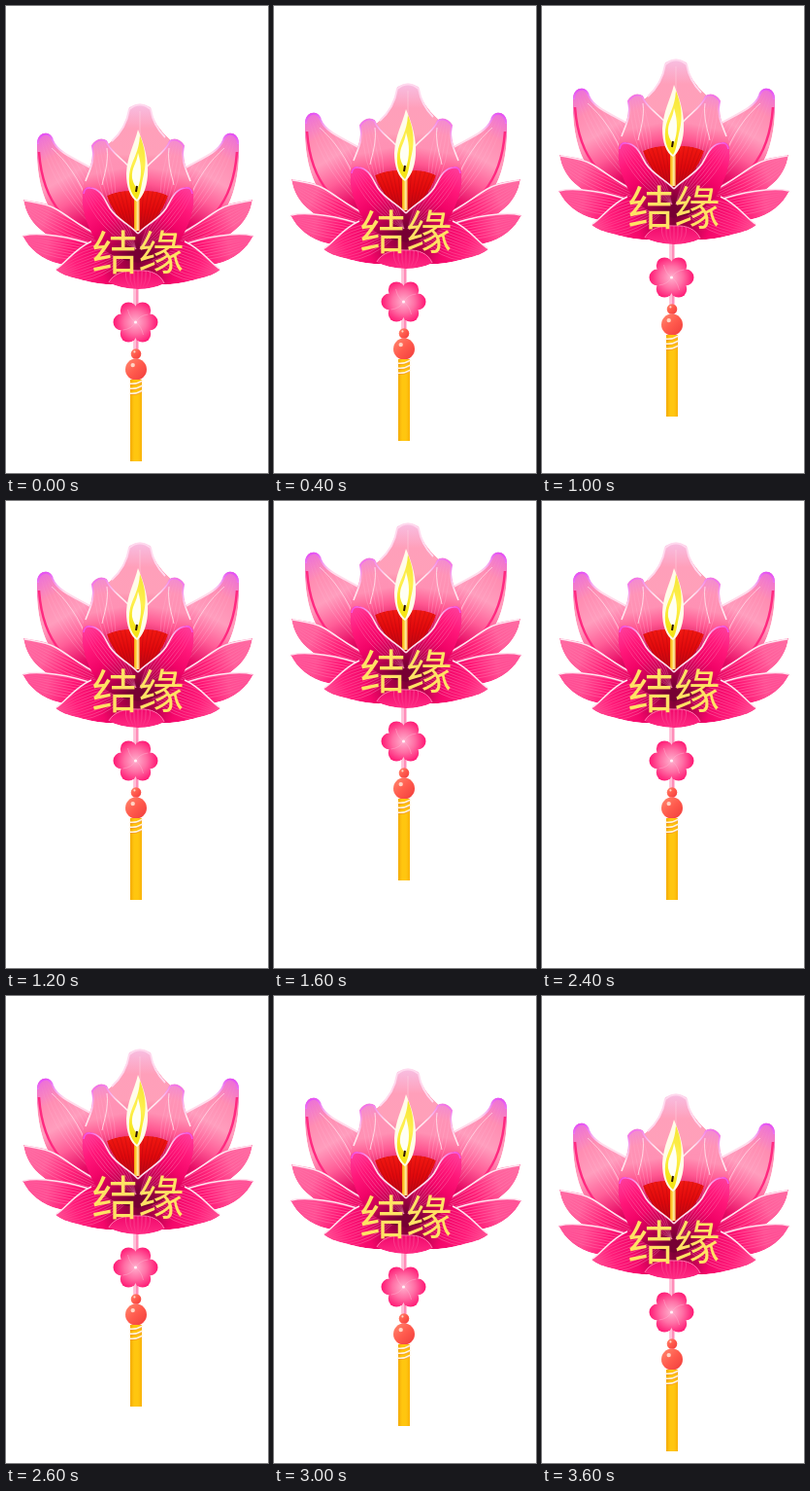
Animation of 270 by 480 pixels, one loop 3.8 s. Source, as an HTML page with a canvas:

```html
<!DOCTYPE html>
<html lang="zh">
<head>
<meta charset="utf-8">
<style>
html, body { margin: 0; width: 100%; height: 100%; overflow: hidden; background: #fff; }
canvas { display: block; width: 270px; height: 480px; }
</style>
</head>
<body>
<canvas id="stage" width="270" height="480"></canvas>
<script>
const ctx = document.getElementById('stage').getContext('2d');
const AXIS = 136;
const STEP = 200;
const LIFT = [0, 11, 21, 26, 36, 46, 58, 68, 78, 90];

function gradient([x0, y0, x1, y1], colors) {
  const g = ctx.createLinearGradient(x0, y0, x1, y1);
  colors.forEach((c, i) => g.addColorStop(i / (colors.length - 1), c));
  return g;
}

function mirrored(draw) {
  draw();
  ctx.save();
  ctx.translate(2 * AXIS, 0);
  ctx.scale(-1, 1);
  draw();
  ctx.restore();
}

function fill(d, style) {
  ctx.fillStyle = style;
  ctx.fill(new Path2D(d));
}

function stroke(d, style, width) {
  ctx.strokeStyle = style;
  ctx.lineWidth = width;
  ctx.stroke(new Path2D(d));
}

function disc(x, y, r, style) {
  ctx.fillStyle = style;
  ctx.beginPath();
  ctx.arc(x, y, r, 0, 2 * Math.PI);
  ctx.fill();
}

// A petal shaded from tip to base, with a fan of veins and a light upper rim.
function petal({ d, line, colors, rim, veins = 0, spread = 25, rimColor = '#ffe3ef', rimWidth = 1.6 }) {
  const [x0, y0, x1, y1] = line;
  const length = Math.hypot(x1 - x0, y1 - y0);
  const nx = (y0 - y1) / length, ny = (x1 - x0) / length;
  ctx.save();
  ctx.clip(new Path2D(d));
  fill(d, gradient(line, colors));
  const veinColor = gradient(line, ['#ffd0e300', '#ffb5d377', '#ff8fbb66']);
  for (let i = 0; i < veins; i++) {
    const k = spread * ((2 * i + 1) / veins - 1);
    const mx = (x0 + x1) / 2 + nx * k, my = (y0 + y1) / 2 + ny * k;
    stroke(`M${x1} ${y1}Q${mx} ${my} ${x0 + nx * k * .3} ${y0 + ny * k * .3}`, veinColor, .7);
  }
  ctx.restore();
  if (rim) stroke(rim, rimColor, rimWidth);
}

function outerPetals() {
  mirrored(() => {
    petal({
      d: 'M32 141C32 134 37 129 43 131Q47 132 48 137C53 150 74 158 92 168L125 240C85 235 62 230 48 213C35 194 31 166 32 141Z',
      line: [42, 130, 104, 238], colors: ['#ec70d8', '#ff8db2', '#ff9dbd', '#ff5e98', '#e80c66', '#9a0042'],
      veins: 8, spread: 30, rim: 'M33 142C33 134 38 131 43 132Q47 134 48 138C53 151 74 158 90 168',
      rimColor: gradient([40, 130, 50, 155], ['#e34af5', '#ffdcec']), rimWidth: 2
    });
    stroke('M34 150C36 177 43 197 56 212', '#ff2a80', 2.5);
    stroke('M47 146C61 158 77 179 85 204', '#ffe4efaa', 1);
    petal({
      d: 'M18 199C31 201 42 202 52 208C67 217 80 229 124 246L120 256C82 250 52 244 38 232C26 223 20 212 18 199Z',
      line: [18, 202, 116, 250], colors: ['#ff6aa2', '#ff5f9b', '#ff2078', '#e60562', '#920040'],
      veins: 9, rim: 'M19 200C31 202 42 203 52 209C66 217 78 228 96 236'
    });
    petal({
      d: 'M17 236C32 231 66 237 118 244L112 270C86 268 70 269 55 265C37 261 24 250 17 236Z',
      line: [17, 238, 122, 258], colors: ['#ff5297', '#ff4c92', '#ff1273', '#dd005c', '#85003a'],
      veins: 10, rim: 'M18 236C34 232 67 237 94 247'
    });
  });
}

function backPetal() {
  petal({
    d: 'M127 104Q138 97 149 104C151 117 158 127 169 137L169 202L105 202L104 143C116 133 124 121 127 104Z',
    line: [136, 100, 136, 205],
    colors: ['#f7c0e4', '#ff9fba', '#ffa0b9', '#f6648f', '#dc2a61'],
    rim: 'M109 139C118 131 125 119 127 106Q138 97 149 106C151 118 156 127 164 135',
    rimColor: '#ffd9ee', rimWidth: 1.8
  });
  stroke('M138 108V132', '#ffe0ea66', 1);
}

function innerPetals() {
  mirrored(() => {
    petal({
      d: 'M88 143Q95 133 104 138C109 151 123 158 130 168Q134 184 132 203L120 235C98 228 82 211 79 196C77 176 93 164 88 143Z',
      line: [95, 137, 112, 220],
      colors: ['#f28ad2', '#ff93b6', '#ff91b4', '#ff5791', '#dc1b61', '#a9063e'],
      veins: 5, spread: 18,
      rim: 'M82 180C87 167 92 158 89 144Q95 135 103 139C109 152 122 158 129 168Q132 179 131 190',
      rimColor: gradient([96, 136, 108, 158], ['#f068ed', '#ffe5ee'])
    });
    stroke('M104 146C106 161 101 174 99 184', '#fff0f5bb', 1);
  });
}

function bowl() {
  const d = 'M104 195Q120 188 136 191Q152 188 167 195C161 214 149 225 136 234C123 225 110 214 104 195Z';
  ctx.save();
  ctx.clip(new Path2D(d));
  fill(d, gradient([136, 188, 136, 234], ['#f21a12', '#df080c', '#b50618']));
  for (let x = 102; x < 174; x += 5) stroke(`M${x} 188L136 260`, '#8c001555', .7);
  ctx.restore();
}

function candle() {
  ctx.fillStyle = gradient([132, 0, 138, 0], ['#f39b12', '#ffcf35', '#fff1b0', '#e75a13']);
  ctx.fillRect(132, 190, 6, 41);
  fill('M136 127C143 144 147 158 146 174C145 188 140 198 135 201C128 197 124 186 124 172C125 154 132 143 136 127Z', '#fffce8');
  fill('M138 133C144 148 145 160 142 173C139 185 139 193 135 199C128 193 125 182 128 168C131 156 137 150 138 133Z',
    gradient([126, 185, 145, 140], ['#f5e51a', '#fff04f', '#f6e638']));
  fill('M136 151C140 164 140 175 136 187Q132 186 130 177C129 166 135 162 136 151Z', '#fffff4');
  stroke('M135 185L134 191', '#2c1205', 2);
}

function frontPetals() {
  mirrored(() => petal({
    d: 'M51 271C61 264 69 250 88 242L136 239L136 276C127 283 117 287 103 286C91 285 80 282 72 280C64 278 57 276 51 271Z',
    line: [54, 276, 134, 247], colors: ['#ff4d93', '#ff1b79', '#f4066a', '#b0004a', '#740032'],
    veins: 12, spread: 30, rim: 'M52 270C62 264 70 250 88 242'
  }));
  petal({
    d: 'M105 284C110 275 122 271 136 272C150 271 160 276 164 285Q151 291 136 291Q119 291 105 284Z',
    line: [136, 291, 136, 255], colors: ['#ff2b83', '#f20a6d', '#a30045'],
    veins: 7, rim: 'M106 284C111 275 122 271 136 272C150 271 159 276 163 285', rimColor: '#ff75ac', rimWidth: 1
  });
  mirrored(() => petal({
    d: 'M79 192Q80 185 87 186C98 187 101 197 107 207C114 218 128 224 136 233L136 264C114 261 97 252 89 235C82 221 77 207 79 192Z',
    line: [84, 187, 134, 250], colors: ['#ff3b98', '#ff1779', '#f20468', '#bd0050', '#760033'],
    veins: 8, spread: 22,
    rim: 'M80 193Q81 186 87 187C98 188 101 198 107 208C114 219 128 225 136 234',
    rimColor: gradient([82, 187, 103, 201], ['#f14fe1', '#ffdfec'])
  }));
}

function pendant() {
  stroke('M134 289V363', '#ff8db9', 5);
  stroke('M133 289V363', '#ffd0e3', 1.5);

  ctx.save();
  ctx.translate(133.5, 325);
  const knotShade = ctx.createRadialGradient(0, 0, 2, 0, 0, 23);
  knotShade.addColorStop(0, '#ffa4c6');
  knotShade.addColorStop(.45, '#ff6fa5');
  knotShade.addColorStop(1, '#ff1673');
  disc(0, 0, 13, knotShade);
  for (let i = 0; i < 6; i++) {
    const a = i * Math.PI / 3;
    disc(14.5 * Math.cos(a), 14 * Math.sin(a), 8.5, knotShade);
  }
  stroke('M-13 8Q-4 7 0 0T13 -8M-8 -13Q-6 -4 0 0T8 13', '#ffb9d466', 1);
  disc(0, 0, 1.6, '#fff0f6');
  ctx.restore();

  const bead = (x, y, r) => {
    disc(x, y, r, gradient([x - r, y - r, x + r, y + r], ['#ff8a70', '#ff5a4d', '#f03c3c']));
    disc(x - r * .3, y - r * .4, r * .2, '#ffd5c5');
  };
  bead(134, 357.5, 5.3);
  bead(134, 373.5, 11);

  ctx.fillStyle = gradient([128, 0, 140, 0], ['#f3aa08', '#ffc60f', '#ffc60f', '#f9b20a']);
  ctx.fillRect(128, 384, 12, 84);
  for (const y of [388, 393, 398]) {
    stroke(`M127 ${y}Q135 ${y + 1} 141 ${y - 3}`, '#fff6e6', 1.6);
    stroke(`M128 ${y + 1.5}Q135 ${y + 2.5} 140 ${y - 1.5}`, '#f08a35', .6);
  }
}

function caption() {
  ctx.font = '500 47.5px "Noto Sans CJK SC", "Noto Sans CJK", sans-serif';
  ctx.textAlign = 'center';
  ctx.textBaseline = 'alphabetic';
  ctx.fillStyle = '#ffe264';
  ctx.fillText('结缘', AXIS, 271);
}

function render(now) {
  const step = Math.floor((now % 3800) / STEP);
  const lift = LIFT[Math.min(step, 18 - step)];
  ctx.clearRect(0, 0, 270, 480);
  ctx.save();
  ctx.translate(0, -lift);
  pendant();
  outerPetals();
  backPetal();
  innerPetals();
  bowl();
  candle();
  frontPetals();
  caption();
  ctx.restore();
  requestAnimationFrame(() => render(performance.now() - start));
}

const start = performance.now();
render(0);
</script>
</body>
</html>
```
